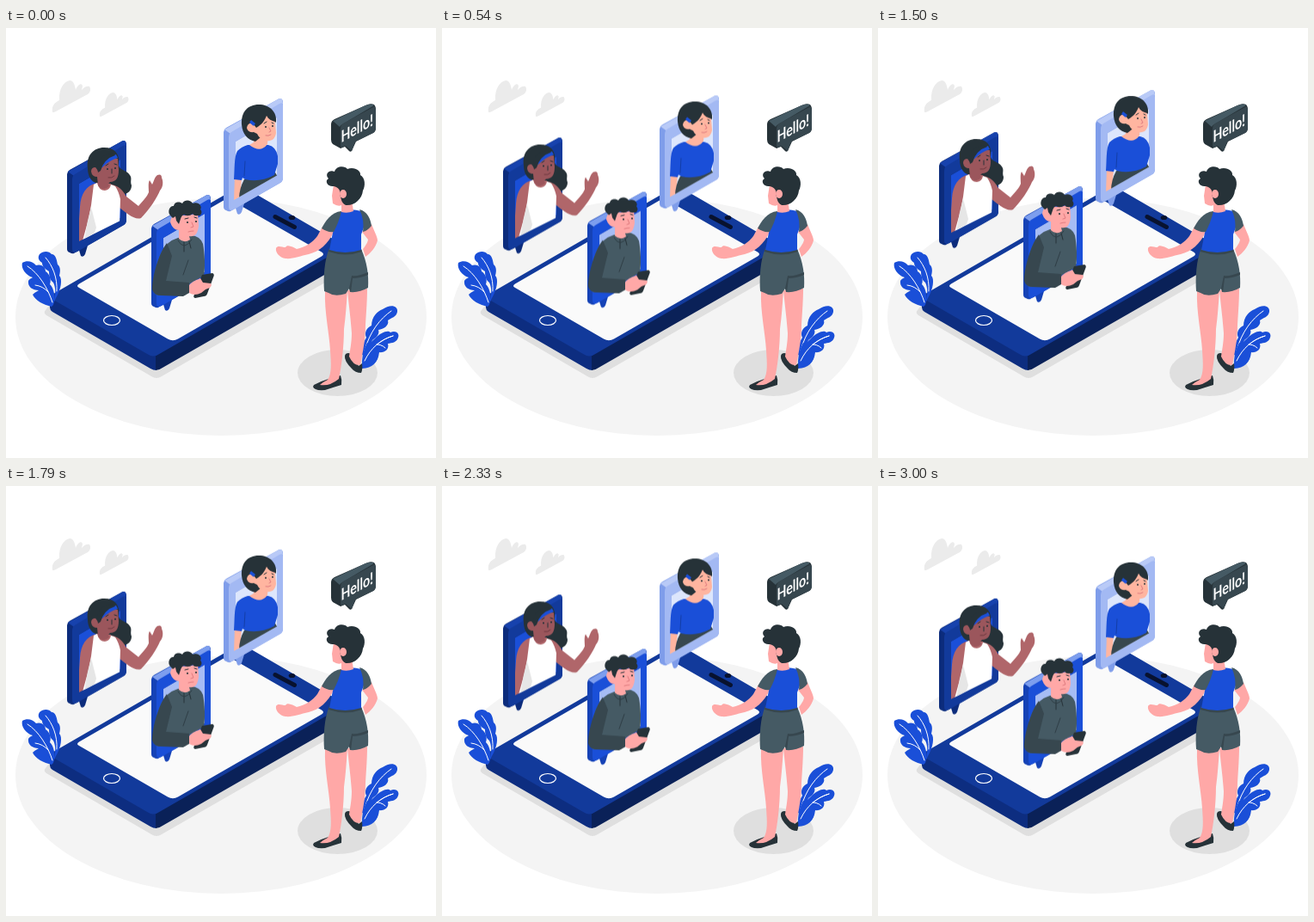
An HTML page for the animation above (3.04 s loop, 500 by 500 pixels).

```html
<!DOCTYPE html>
<html lang="en">
<head>
<meta charset="utf-8">
<title>Video call</title>
<style>
  html, body { margin: 0; width: 100%; height: 100%; overflow: hidden; background: #fff; }
  svg { display: block; width: 100vw; height: 100vh; }
  .blue { fill: #1a4fd8; }
  .ink { fill: #263238; }
  .slate { fill: #455a64; }
  .deep { fill: #37474f; }
  .skin { fill: #ffa8a7; }
  .peach { fill: #ffb5a0; }
  .brown { fill: #b0666a; }
  .line { fill: none; stroke-linecap: round; stroke-linejoin: round; }
  .navy { --front: #123a9b; --side: #0c2c7c; --top: #1742ad; --glass: #1a4fd8; }
  .bright { --front: #1a4fd8; --side: #1542b6; --top: #7d9eee; --glass: #a6bcf4; }
  .pale { --front: #a3b9f3; --side: #7f9dea; --top: #b9caf7; --glass: #dde6fc; }
  .hello { font: 700 19px Lato, "Open Sans", sans-serif; fill: #fff; }
</style>
</head>
<body>
<svg viewBox="0 0 500 500">
  <defs>
    <path id="cloud" fill="#ebebeb" d="M54 97C53 91 56 87 62 84C61 70 68 62 74 61C79 61 80 67 81 72C83 67 87 63 89 67C89 69 88 71 88 72C91 68 95 67 97 68C99 71 98 75 95 77L58 97C56 98 54 99 54 97Z"/>
    <g id="card">
      <path fill="var(--glass)" d="M12 48L64 18V92L12 121Z"/>
      <path fill="var(--side)" fill-rule="evenodd" d="M0 39Q0 36 3 34L63 1Q66-1 68 1Q69 2 69 5V92Q69 96 66 98L24 122L21 132Q19 136 16 134L14 127.500L8 131Q6 132 3 130Q0 129 0 126ZM14 50V117L62 90V22Z"/>
      <path fill="var(--top)" d="M1 36L63 1Q66-1 68 1L69 6L8 41Z"/>
      <path fill="var(--front)" fill-rule="evenodd" d="M6 45Q6 41 9 39L65 6Q69 4 69 8V92Q69 96 66 98L12 129Q6 132 6 126ZM14 50V117L62 90V22Z"/>
    </g>
    <clipPath id="inNavy"><path d="M85 110H200V224H133L85 248Z"/></clipPath>
    <clipPath id="inPale"><path d="M265 70H330V163L316 171L265 200Z"/></clipPath>
  </defs>

  <ellipse cx="250" cy="336" rx="239" ry="138" fill="#f4f4f4"/>
  <use href="#cloud"/>
  <use href="#cloud" transform="translate(68 28.600) scale(.76)"/>

  <!-- phone -->
  <path fill="#dfdfdf" d="M46 328Q43 331 47 334L169 405Q175 409 181 405L385 288L380 262L60 310Z"/>
  <path fill="#0d2d80" d="M51 313V325Q51 328 54 330L168 396Q171 398 175 398V378Z"/>
  <path fill="#0a2158" d="M174 380V398Q178 398 182 395L386 278Q393 273 393 262V250Z"/>
  <path fill="#123a9b" d="M57 308L263 189Q276 182 286 190.500L385 248Q397 253 385 260L180 378Q172 384 165 379.500L55 316Q48 312 57 308Z"/>
  <path fill="#fafafa" d="M85 297.500L252 201Q258 198 264 201.500L367 260.500Q371 263 367 265.500L200 361.500Q194 365 188 361.500L85 302Q81 300 85 297.500Z"/>
  <ellipse cx="123" cy="340" rx="9.500" ry="5.500" fill="none" stroke="#fff" stroke-width="1.200"/>
  <path class="line" stroke="#08122f" stroke-width="5" d="M313 219.500L335.500 231.500"/>
  <ellipse cx="332.500" cy="220.500" rx="3.800" ry="2.600" fill="#08122f"/>

  <!-- plants -->
  <g class="blue">
    <path d="M55 320C58 310 58 302 55 296C51 293 50 288 50 283C45 280 42 277 42 273C37 270 37 266 39 263C43 259 50 259 53 263C58 263 59 270 60 275C64 278 63 284 62 288C66 292 64 304 58 314Z"/>
    <path d="M53 324C44 322 34 317 31 310C34 307 37 306 38 305C31 305 25 301 26 294C28 291 30 291 31 290C23 288 17 279 19 273C24 270 31 271 35 276C40 274 46 277 46 283C51 286 53 293 51 298C56 303 58 313 55 322Z"/>
    <path d="M414 388C411 378 415 366 419 360C416 354 420 348 425 346C425 336 432 329 438 327C446 321 456 322 455 330C454 336 448 337 444 340C446 346 439 350 433 351C435 356 430 360 426 363L420 378Z"/>
    <path d="M414 396C413 382 420 368 429 361C436 354 444 351 447 354C453 351 458 355 456 360C454 366 449 366 444 367C446 374 440 378 433 377C434 388 424 396 414 396Z"/>
  </g>
  <path class="line" stroke="#fff" d="M46 267C54 276 60 290 59 306M25 277C38 285 49 303 54 319M34 299Q43 300 49 307M448 329C435 338 423 353 417 375M450 358C436 362 424 372 417 387M428 368Q436 367 441 372"/>

  <!-- floating calls -->
  <g id="calls">
    <use href="#card" class="navy" x="71" y="131"/>
    <g clip-path="url(#inNavy)">
      <path class="ink" d="M95 163C93 148 102 139 114 139C127 139 133 147 131 160C133 166 140 165 144 171C147 175 144 178 146 183C146 190 140 194 135 193C129 191 125 186 120 182L104 180C97 177 95 169 95 163Z"/>
      <path class="brown" d="M106 180C93 183 87 193 86 208C85 225 83 240 84 254L91 247C92 236 97 224 99 214L106 196L126 192L122 181Z"/>
      <path class="brown" d="M122 182C131 183 136 189 140 196L154 207C160 200 164 196 166 191C166 186 165 180 167 177L170 182C172 178 173 173 176 171Q181 169 181 174C183 178 183 185 179 189C176 197 166 212 157 221C150 224 140 215 132 209Z"/>
      <path fill="#fff" d="M102 182L106 180Q108 189 115 189Q121 188 122 182L127 184Q131 190 133 199L132 229L88 251L96 222L99 206Z"/>
      <path fill="#e6e6e6" d="M99 208L105 232L103 238L91 247L95 224Z"/>
      <path fill="#9b565c" d="M110 161C117 153 125 150 130 152L131 165C131 174 128 179 121 179L119 181L120 184Q113 191 107 183L106 173Q100 173 99 167Q99 162 104 162L107 166Z"/>
      <path class="blue" d="M110 163Q113 151 128 147L130 151Q120 154 112 162Z"/>
      <path class="ink" d="M106 163C105 153 113 146 125 146L127 148Q114 152 110 166L107 168Z"/>
      <path class="line" stroke="#263238" d="M116 160L119 158M126 158L129 159M123 164V169"/>
      <path class="line" stroke="#6f3940" d="M119 174Q123 175 126 172"/>
      <circle class="ink" cx="118" cy="164" r="1.100"/><circle class="ink" cx="127" cy="163" r="1.100"/>
    </g>

    <use href="#card" class="pale" x="253" y="82"/>
    <g clip-path="url(#inPale)">
      <path class="peach" d="M266 172L274 174L272 199L265 202Z"/>
      <path class="deep" d="M277 176L313 168L316 173L271 199Q271 187 277 176Z"/>
      <path class="blue" d="M281 136H305Q314 138 316 149L316 158L312 171Q295 180 278 176L275 174L274 177L265 176C266 165 265 150 269 143Q274 138 281 136Z"/>
      <path class="line" stroke="#123a9b" stroke-width=".8" d="M278 155L277 172"/>
    </g>
    <path class="peach" d="M288 122L305 122L304 135Q296 146 283 136L288 133Z"/>
    <path class="ink" d="M274 112C273 98 281 89 294 89C306 89 315 97 314 109L300 124L290 132C281 130 275 124 274 112Z"/>
    <path class="peach" d="M291 116C298 112 301 107 303 102C305 106 309 108 313 109L314 122C313 129 309 132 303 131Q295 130 292 123L288 121Q281 122 280 116Q281 110 287 111Z"/>
    <path class="blue" d="M285 107L290 111L288 114L283 110Z"/>
    <path class="line" stroke="#263238" d="M300 111L303 109M309 110L311 111"/>
    <path class="line" stroke="#e07c80" d="M306 116L308 120L306 121M302 125Q305 126 308 124"/>
    <circle class="ink" cx="302" cy="115" r="1"/><circle class="ink" cx="310" cy="114" r="1"/>

    <use href="#card" class="bright" x="169" y="194"/>
    <path class="slate" d="M200 244Q187 248 181 260C174 275 172 290 171 303Q172 310 178 311L208 311L214 297L230 288C232 277 231 262 229 251Q226 242 215 241Z"/>
    <path class="deep" d="M187 250C178 262 170 288 170 304Q172 311 180 311L206 312L213 308V296L186 294L193 265Z"/>
    <path class="skin" d="M203 217Q215 220 223 213L224 230C223 240 219 243 213 242L214 246Q207 251 201 245L201 235Q194 235 191 226Q192 217 198 219Z"/>
    <path class="ink" d="M191 218C187 213 191 206 195 207C196 201 203 202 205 204C208 199 215 200 217 204C223 201 229 207 226 211C229 214 227 219 223 218Q219 219 217 216Q212 220 207 217Q204 218 203 222L201 228L198 224L197 219L194 221Z"/>
    <path class="line" stroke="#263238" d="M208 222L212 221M219 220L222 221M207 249V260M213 248L215 256"/>
    <path class="line" stroke="#e07c80" d="M216 226L218 231L215 232M212 237Q215 236 218 236"/>
    <circle class="ink" cx="211" cy="226" r="1.100"/><circle class="ink" cx="221" cy="225" r="1.100"/>
    <path class="line" stroke="#2f3e46" d="M200 247Q207 260 216 246M212 270L206 287"/>
    <path class="ink" d="M228 287L240 285Q243 286 241 290L234 309Q233 312 230 312L220 314Q217 313 219 310Z"/>
    <path class="skin" d="M213 299C217 294 222 293 226 291L229 296L238 297Q240 299 237 302L232 304L227 308Q219 312 213 308Z"/>
  </g>

  <!-- caller -->
  <ellipse cx="385.500" cy="401" rx="46.500" ry="27" fill="#dfdfdf"/>
  <path class="blue" d="M414 396Q413 378 420 366L430 366L434 377Q432 395 414 396Z"/>
  <path class="line" stroke="#fff" d="M450 358C436 362 424 372 417 387"/>
  <path class="ink" d="M395 379Q400 376 403 382L410 393L414 390Q415 397 413 401Q406 401 402 396Q393 387 394 381Z"/>
  <path class="skin" d="M397 305C399 325 401 340 402 355C402 365 400 375 399 382Q404 393 412 392C414 380 418 365 418 345C419 330 420 315 420 303Z"/>
  <path class="ink" d="M358 415Q365 411 375 408L389 404Q391 409 390 415Q380 418 371 421Q358 422 357 417Z"/>
  <path class="skin" d="M371 306C370 330 376 355 377 375C378 390 379 402 374 409Q368 412 365 415Q376 417 387 408C390 395 393 370 393 350C395 335 396 320 397 305Z"/>
  <path class="skin" d="M425 228C428 236 432 243 432 247C430 255 424 262 418 266L415 257C419 252 421 248 421 246L414 237Z"/>
  <path class="skin" d="M368 231L381 237C375 251 364 260 352 263C342 265 333 269 325 268C318 267 313 261 314 256C316 252 321 255 325 255C327 251 334 255 338 257C348 255 357 249 362 242Z"/>
  <path class="slate" d="M376 256Q395 264 413 257C420 272 422 288 421 302Q411 308 400 307L399 303L395 309Q382 313 375 308L370 306C369 290 370 270 376 256Z"/>
  <path class="deep" d="M421 284Q410 289 402 288L399 303L401 307L403 291Q412 291 421 287ZM376 256Q395 264 413 257L414 260Q395 267 375 260Z"/>
  <path class="blue" d="M388 214Q400 209 413 213L419 224L413 240V258Q394 264 376 258L380 238Z"/>
  <path class="slate" d="M390 213C378 214 371 225 367 233Q374 238 381 237Q387 226 390 213Z"/>
  <path class="slate" d="M411 211C420 213 424 222 425 230Q420 236 415 237Q417 223 411 211Z"/>
  <path class="skin" d="M381 182L379 195L380 204Q386 208 390 206L390 214Q397 216 404 213L402 200L392 183Z"/>
  <path class="ink" d="M381 184C374 185 370 178 375 175C370 170 376 164 382 167C384 160 394 160 397 164C405 161 413 166 412 171C418 174 418 184 415 189C414 199 405 207 395 206C389 203 390 197 388 194C390 189 386 185 381 184Z"/>
  <ellipse class="skin" cx="392" cy="193" rx="4" ry="5"/>

  <!-- speech bubble -->
  <path class="ink" d="M378 112Q378 108 382 106L418 90Q424 87 428 89Q430 91 430 94V116Q430 120 427 122L407 132L402 143Q400 145 398 142L394 138L389 140L380 135Q378 133 378 130Z"/>
  <path class="slate" d="M380 108L418 90Q425 87 428 90L391 112Q389 113 388 115Z"/>
  <path class="deep" d="M389 117Q389 113 392 111L427 92Q430 91 430 95V116Q430 120 427 122L406 132L402 143L395 137L391 139Q389 139 389 136Z"/>
  <text class="hello" transform="matrix(.75 -.41 0 1 389.500 133.500)">Hello!</text>
</svg>
<script>
  const LOOP = 3040, RISE = 10;
  const steps = [0, -RISE, 0].map(y => ({ transform: `translateY(${y}px)` }));
  document.getElementById("calls").animate(steps, { duration: LOOP, iterations: Infinity });
</script>
</body>
</html>
```
